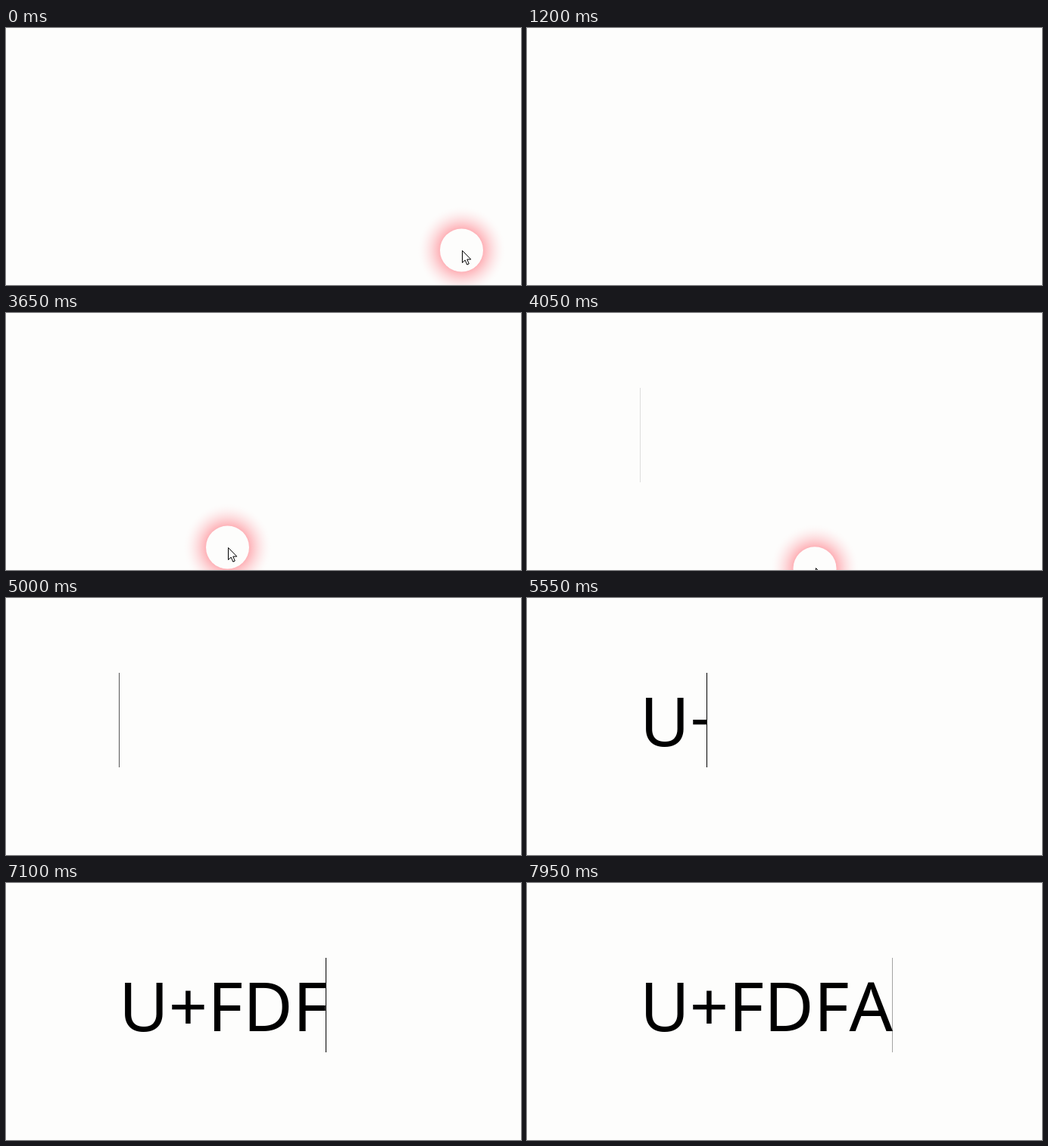
Animation, 680 px wide and 340 px high, one loop 8 s. Source, as an HTML page with a canvas:

```html
<!DOCTYPE html>
<html lang="en">
<head>
<meta charset="utf-8">
<title>Typing a code point</title>
<style>
  html, body { margin: 0; width: 100%; height: 100%; overflow: hidden; background: #fdfdfc; }
  canvas { display: block; }
</style>
</head>
<body>
<canvas id="stage" width="680" height="340"></canvas>
<script>
const ctx = document.getElementById('stage').getContext('2d');
const LOOP = 8000, STEP = 50, PAPER = '#fdfdfc';
const TEXT = 'U+FDFA', TEXT_X = 149, BASELINE = 196;
const KEY_TIMES = [5100, 5550, 6000, 6250, 7000, 7200];
const CARET_SHOWN = 3700, FIRST_FADE = 3900;

// Time and place of each turn in the pointer's visit
const visit = [
  { t: 3300, x: 640, y: 380 },
  { t: 3500, x: 200, y: 340 },
  { t: 3650, x: 292.5, y: 310 },
  { t: 3950, x: 342, y: 304 },
  { t: 4200, x: 450, y: 400 }
];

const clamp = v => Math.min(1, Math.max(0, v));
const smooth = p => p * p * (3 - 2 * p);
const lerp = (a, b, p) => a + (b - a) * p;

function pointerAt(t) {
  if (t < 1200) {
    const p = clamp((t - 900) / 300) ** 2;
    return { x: 601.5 + 110 * p, y: 294 + 116 * p };
  }
  const next = visit.findIndex(turn => turn.t > t);
  if (next < 1) return null;
  const a = visit[next - 1], b = visit[next];
  const p = smooth((t - a.t) / (b.t - a.t));
  return { x: lerp(a.x, b.x, p), y: lerp(a.y, b.y, p) };
}

function disc(x, y, radius, fill) {
  ctx.fillStyle = fill;
  ctx.beginPath();
  ctx.arc(x, y, radius, 0, 2 * Math.PI);
  ctx.fill();
}

function drawPointer({ x, y }) {
  const glow = ctx.createRadialGradient(x, y, 28, x, y, 58);
  for (let p = 0; p <= 1; p += 0.125) {
    glow.addColorStop(p, `rgba(255, 70, 85, ${0.42 * (1 - p) ** 1.7})`);
  }
  disc(x, y, 58, glow);
  disc(x, y, 28.5, PAPER);

  ctx.save();
  ctx.translate(Math.floor(x) + 1.5, Math.floor(y) + 0.5);
  const arrow = new Path2D('M0 0V16L3.7 12.6L6.3 18.6L8.8 17.5L6.3 11.6H11.3Z');
  ctx.fillStyle = '#fff';
  ctx.fill(arrow);
  ctx.stroke(arrow);
  ctx.restore();
}

// The caret stays on while typing, then blinks with soft fades
function caretAlpha(t) {
  if (t < CARET_SHOWN) return 0;
  const lastKey = KEY_TIMES.findLast(time => time <= t);
  const phase = t - (lastKey ? lastKey + 650 : FIRST_FADE);
  if (phase < 0) return 1;
  const p = phase % 1050;
  return p < 500 ? clamp(1 - p / 200) ** 1.5 : clamp((p - 500) / 250);
}

// Letters are uncovered by the gliding caret
function drawTyping(t) {
  ctx.font = '90px "Noto Sans", "Open Sans", sans-serif';
  ctx.fillStyle = '#000';
  let caret = TEXT_X;
  KEY_TIMES.forEach((start, i) => {
    if (t < start) return;
    const left = caret, p = clamp((t - start + STEP) / 200);
    caret += ctx.measureText(TEXT[i]).width * (1 - (1 - p) ** 2);
    ctx.save();
    ctx.beginPath();
    ctx.rect(0, 0, caret, 340);
    ctx.clip();
    ctx.fillText(TEXT[i], left, BASELINE);
    ctx.restore();
  });
  ctx.globalAlpha = caretAlpha(t);
  ctx.fillRect(Math.floor(caret), 99, 1, 125);
  ctx.globalAlpha = 1;
}

function draw(now) {
  const t = Math.floor((now % LOOP) / STEP) * STEP;
  ctx.fillStyle = PAPER;
  ctx.fillRect(0, 0, 680, 340);
  const pointer = pointerAt(t);
  if (pointer) drawPointer(pointer);
  drawTyping(t);
}

let origin;
function frame(now) {
  origin ??= now;
  draw(now - origin);
  requestAnimationFrame(frame);
}
requestAnimationFrame(frame);
</script>
</body>
</html>
```
